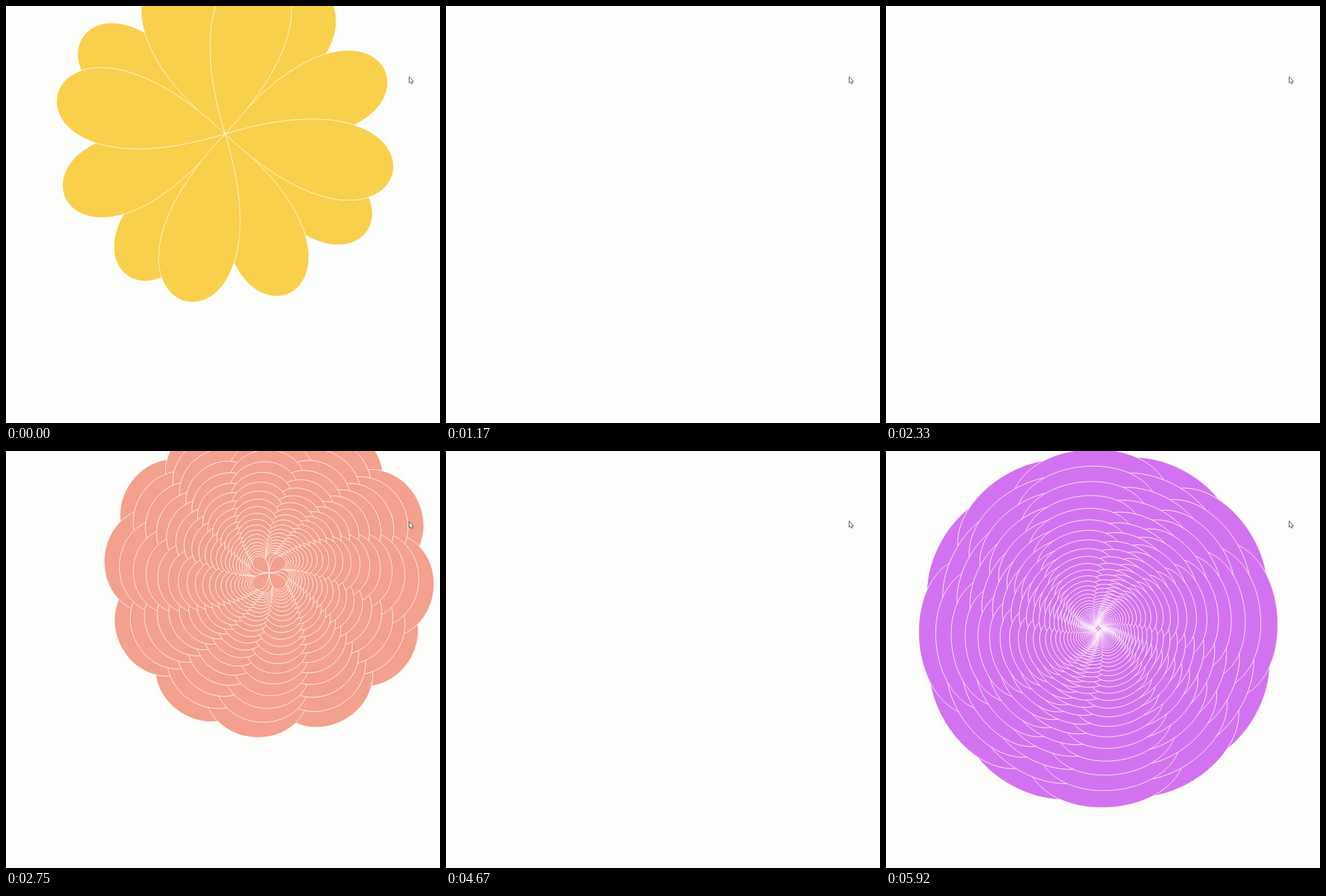
An HTML page with a canvas that plays this animation: 640x616 px, repeating every 6010 ms.

```html
<!DOCTYPE html>
<html>
<head>
<meta charset="utf-8">
<style>
html, body { margin: 0; width: 100%; height: 100%; overflow: hidden; background: #fdfdfb; }
canvas { display: block; }
</style>
</head>
<body>
<canvas id="stage" width="640" height="616"></canvas>
<script>
const ctx = document.getElementById('stage').getContext('2d');
const LOOP = 6010, STEP = 83.4, RATE = 4, SHRINK = 0.906, MAX_TIERS = 43;
const PAPER = '#fdfdfb';
const QUARTERS = [0, 180, 90, 270];

// from/to: visible steps; turn: angle between petal rings; unwind: how much it closes per tier (degrees)
const flowers = [
  { from: 0, to: 14, x: 323, y: 189, length: 254, half: 57, turn: 34.4, unwind: 0.8, tiers: 1, color: '#f9d04c' },
  { from: 15, to: 28, x: 208.5, y: 190, length: 246, half: 52, turn: 21.6, unwind: 1.03, tiers: 6, color: '#ea55cb' },
  { from: 29, to: 41, x: 388, y: 180, length: 244, half: 80, turn: 32, unwind: 0.8, tiers: 6, color: '#f3a08c' },
  { from: 41, to: 56, x: 312, y: 419, length: 54, half: 105, turn: 56, unwind: 1.3, tiers: 1, color: '#f0a6ac' },
  { from: 57, to: 72, x: 313, y: 262, length: 265, half: 119, turn: 28.8, unwind: 0.65, tiers: 1, color: '#d272f0' }
];

// A single cubic loop; its peak is 3/4 of the handle height
function petal(length, half, degrees) {
  const h = length / 0.75, w = half / 0.2887;
  ctx.save();
  ctx.rotate(degrees * Math.PI / 180);
  ctx.beginPath();
  ctx.moveTo(0, 0);
  ctx.bezierCurveTo(h, -w, h, w, 0, 0);
  ctx.fill();
  ctx.stroke();
  ctx.restore();
}

// Each tier is three rings of four petals; smaller tiers lie on top and close up
function drawFlower(f, step) {
  const tiers = Math.min(MAX_TIERS, f.tiers + RATE * (step - f.from));
  ctx.save();
  ctx.translate(f.x, f.y);
  ctx.fillStyle = f.color;
  ctx.strokeStyle = '#fffdf6';
  ctx.lineWidth = 0.8;
  for (let n = 0; n < tiers; n++) {
    const scale = SHRINK ** n;
    const turn = Math.max(0, f.turn - f.unwind * n);
    for (let ring = 1; ring <= 3; ring++) {
      for (const q of QUARTERS) petal(f.length * scale, f.half * scale, ring * turn + q);
    }
  }
  ctx.restore();
}

function drawCursor(x, y) {
  ctx.save();
  ctx.translate(x + 0.5, y + 0.5);
  ctx.fillStyle = PAPER;
  ctx.strokeStyle = '#555555';
  ctx.lineWidth = 1;
  const arrow = new Path2D('M0 0V9L2 7.5L3.5 10.5L5 10L4 7H6.5Z');
  ctx.fill(arrow);
  ctx.stroke(arrow);
  ctx.restore();
}

let shown = -1;
function render(now) {
  const step = Math.min(71, Math.floor((now % LOOP + 6) / STEP));
  if (step !== shown) {
    shown = step;
    ctx.fillStyle = PAPER;
    ctx.fillRect(0, 0, 640, 616);
    const flower = flowers.find(f => step >= f.from && step < f.to);
    if (flower) drawFlower(flower, step);
    drawCursor(594, step < 41 ? 104 : 103);
  }
  requestAnimationFrame(render);
}
render(performance.now());
</script>
</body>
</html>
```
